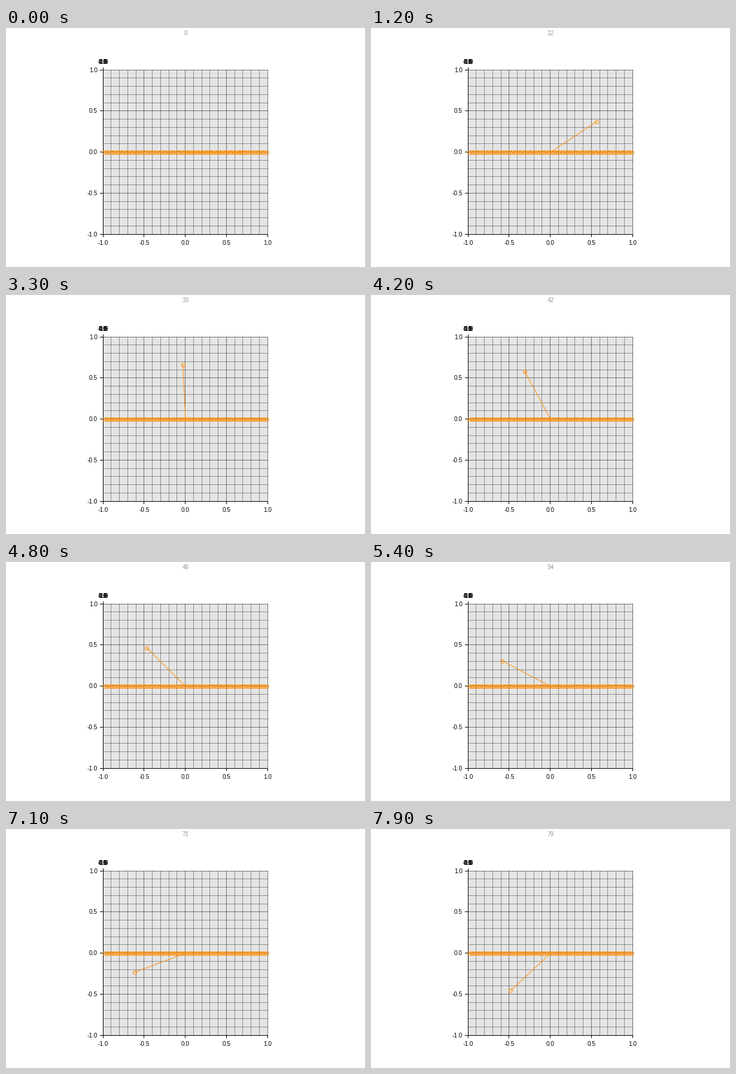
Recreate the animation shown at these times as a matplotlib script. Size 600 by 400 pixels, loop 8 s.

```python
import matplotlib.pyplot as plt
import numpy as np
from matplotlib.animation import FuncAnimation
from matplotlib.patches import Rectangle

plt.rcParams["font.family"] = "Liberation Sans"
plt.rcParams["axes.unicode_minus"] = False

DPI = 100
PX = 72 / DPI                      # points per pixel
FRAMES, STEP_MS = 80, 100
ORANGE = "#ff8c00"
LEFT, TOP, SIZE = 162, 70, 275
RIGHT, BOTTOM = LEFT + SIZE, TOP + SIZE
MID_X, MID_Y = 300, 208
ORBIT_X, RADIUS = 300.5, 91.6
TURN = np.radians(2.822)           # rotation per step

fig = plt.figure(figsize=(6, 4), dpi=DPI, facecolor="white")
ax = fig.add_axes([0, 0, 1, 1])
ax.set_xlim(0, 600)
ax.set_ylim(400, 0)
ax.axis("off")


def line(xs, ys, color="black", **kw):
    return ax.plot(xs, ys, color=color, lw=PX, snap=False, **kw)[0]


def crisp(xs, ys, **kw):
    """Line through the centres of whole pixels."""
    return line(np.floor(xs) + 0.5, np.floor(ys) + 0.5,
                solid_capstyle="projecting", **kw)


def label(x, y, text, ha="center", color="black"):
    return ax.text(x, y, text, ha=ha, va="baseline", color=color, fontsize=10 * PX)


def rings(xs, ys):
    return ax.plot(xs, ys, "o", ms=6 * PX, mew=PX, mfc="none", mec=ORANGE,
                   snap=False)[0]


def to_px(v):
    return LEFT + (v + 1) / 2 * SIZE, BOTTOM - (v + 1) / 2 * SIZE


# panel and grid
ax.add_patch(Rectangle((LEFT, TOP), SIZE + 1, SIZE + 1, fc="#e5e5e5", ec="none",
                       snap=False))
for i in range(21):
    x, y = to_px(-1 + i / 10)
    alpha = 0.5 if i % 5 == 0 else 0.38
    crisp([x, x], [TOP, BOTTOM], alpha=alpha)
    crisp([LEFT, RIGHT], [y, y], alpha=alpha)

# axes, ticks and labels; the depth axis is seen end-on, so its labels overlap
crisp([LEFT, LEFT], [66, BOTTOM + 4])
crisp([LEFT - 5, RIGHT], [BOTTOM, BOTTOM])
for v in np.linspace(-1, 1, 5):
    x, y = to_px(v)
    crisp([x, x], [BOTTOM, BOTTOM + 4])
    crisp([LEFT - 5, LEFT], [y, y])
    label(x + 0.5, 363, f"{v:.1f}")
    label(153, np.floor(y) + 4, f"{v:.1f}", ha="right")
    label(LEFT, 59.5, f"{v:.1f}")

# row of rings along the middle
count = 80
row = LEFT + 0.5 + (np.arange(count) + 0.5) * SIZE / count
line([row[0], RIGHT + 1], [MID_Y, MID_Y], ORANGE, alpha=0.7)
rings(row, np.full(count, MID_Y))

arm = line([], [], ORANGE)
tip = rings([], [])
counter = label(300, 12, "", color="#999999")


def update(n):
    a = n * TURN
    x, y = ORBIT_X + RADIUS * np.cos(a), MID_Y - RADIUS * np.sin(a)
    arm.set_data([MID_X, x], [MID_Y, y])
    tip.set_data([x], [y])
    counter.set_text(str(n))
    return arm, tip, counter


anim = FuncAnimation(fig, update, frames=FRAMES, interval=STEP_MS,
                     repeat=True, repeat_delay=0, blit=False)
plt.show()
```
